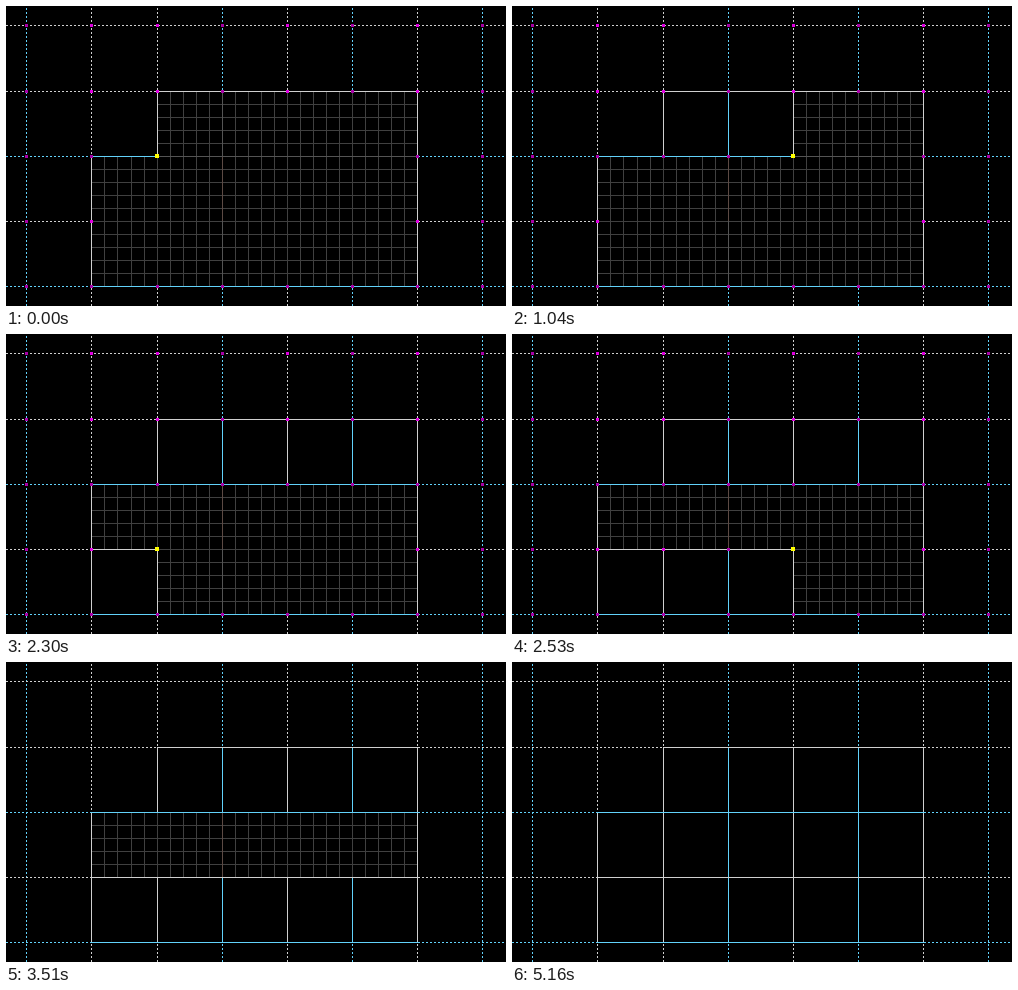
An HTML page with a canvas for the animation above (6170 ms loop, 500 by 300 pixels).

```html
<!DOCTYPE html>
<html lang="en">
<head>
<meta charset="utf-8">
<title>Grid cells</title>
<style>
html, body { margin: 0; width: 100%; height: 100%; overflow: hidden; background: #000; }
canvas { display: block; }
</style>
</head>
<body>
<canvas id="stage" width="500" height="300"></canvas>
<script>
const ctx = document.getElementById('stage').getContext('2d');
const LOOP = 6170, STEP = 65.12, COLS = 8, ROWS = 5;
const LIGHT = '#d0d0d0', BLUE = '#62d2fa';
const FINE = '#404040', AXIS = '#545454', WARM_AXIS = '#5c4a44', ORANGE = '#e88c4a';

const gx = i => 20.83 + STEP * i;
const gy = j => 19.9 + STEP * j;
const px = i => Math.floor(gx(i));
const py = j => Math.floor(gy(j));
const colColor = i => [0, 3, 5, 7].includes(i) ? BLUE : LIGHT;
const rowColor = j => j === 2 || j === 4 ? BLUE : LIGHT;

// For each row of cells: first column and the times at which its cells close.
const bands = {
  1: { first: 2, times: [410, 1040, 1740, 1920] },
  2: { first: 1, times: [3910, 4290, 4520, 4840, 5160] },
  3: { first: 1, times: [2300, 2450, 2530, 2785, 2870] }
};

// Highlighted node: [start time, column, row]
const cursor = [
  [0, 2, 2], [90, 2, 1], [410, 3, 2], [640, 3, 1], [1040, 4, 2], [1340, 4, 1],
  [1740, 5, 2], [1830, 5, 1], [1920], [2070, 1, 4], [2300, 2, 3], [2375, 2, 4],
  [2450, 3, 3], [2530, 4, 3], [2700, 4, 4], [2785, 5, 3], [2870]
];
const DOTS_END = 3510;

function closeTime(i, j) {
  const band = bands[j];
  return band ? band.times[i - band.first] : undefined;
}
const inShape = (i, j) => closeTime(i, j) !== undefined;
const isOpen = (i, j, t) => inShape(i, j) && t < closeTime(i, j);

function rect(color, x, y, w, h) {
  ctx.fillStyle = color;
  ctx.fillRect(x, y, w, h);
}

function eachCell(fn) {
  for (const j of [1, 2, 3]) {
    for (let i = 1; i <= 5; i++) if (inShape(i, j)) fn(i, j);
  }
}

function drawDashes() {
  for (let i = 0; i < COLS; i++) {
    for (let y = 2; y < 300; y += 4) rect(colColor(i), px(i), y, 1, 2);
  }
  for (let j = 0; j < ROWS; j++) {
    for (let x = 0; x < 500; x += 4) rect(rowColor(j), x, py(j), 2, 1);
  }
}

function drawFine(i, j) {
  const x = px(i), y = py(j), w = px(i + 1) - x, h = py(j + 1) - y;
  for (let k = 0; k < 5; k++) {
    rect(FINE, px(i + k / 5), y, 1, h);
    rect(FINE, x, py(j + k / 5), w, 1);
  }
  if (i === 3) rect(j === 2 ? WARM_AXIS : AXIS, x, y, 1, h);
  if (j === 2) rect(AXIS, x, y, w, 1);
}

function drawEdges(t) {
  for (let j = 1; j <= 4; j++) {
    for (let i = 1; i <= 6; i++) {
      const x = px(i), y = py(j);
      const here = inShape(i, j), open = isOpen(i, j, t);
      const used = (a, b) => here || inShape(a, b);
      const hidden = (a, b) => open && isOpen(a, b, t);
      if (used(i - 1, j) && !hidden(i - 1, j)) {
        const warm = i === 3 && j === 2 && open;
        rect(warm ? ORANGE : colColor(i), x, y, 1, py(j + 1) - y + 1);
      }
    }
  }
  for (let j = 1; j <= 4; j++) {
    for (let i = 1; i <= 5; i++) {
      if (!inShape(i, j) && !inShape(i, j - 1)) continue;
      if (isOpen(i, j, t) && isOpen(i, j - 1, t)) continue;
      rect(rowColor(j), px(i), py(j), px(i + 1) - px(i) + 1, 1);
    }
  }
}

function drawDots(t) {
  for (let j = 0; j < ROWS; j++) {
    for (let i = 0; i < COLS; i++) {
      const buried = isOpen(i, j, t) && isOpen(i - 1, j, t) &&
        isOpen(i, j - 1, t) && isOpen(i - 1, j - 1, t);
      if (buried) continue;
      const bright = colColor(i) === LIGHT && rowColor(j) === LIGHT;
      rect(bright ? '#e000e0' : '#a800a8', px(i) - 1, py(j) - 1, 3, 3);
    }
  }
  const [, i, j] = cursor.filter(c => c[0] <= t).pop();
  if (i !== undefined) {
    rect('#ffff00', Math.floor(gx(i) - 1.5), Math.floor(gy(j) - 1.5), 4, 4);
  }
}

function draw(t) {
  rect('#000', 0, 0, 500, 300);
  drawDashes();
  eachCell((i, j) => {
    rect('#000', px(i), py(j), px(i + 1) - px(i), py(j + 1) - py(j));
    if (isOpen(i, j, t)) drawFine(i, j);
  });
  drawEdges(t);
  if (t < DOTS_END) drawDots(t);
}

const start = performance.now();
function tick() {
  draw((performance.now() - start) % LOOP);
  requestAnimationFrame(tick);
}
tick();
</script>
</body>
</html>
```
